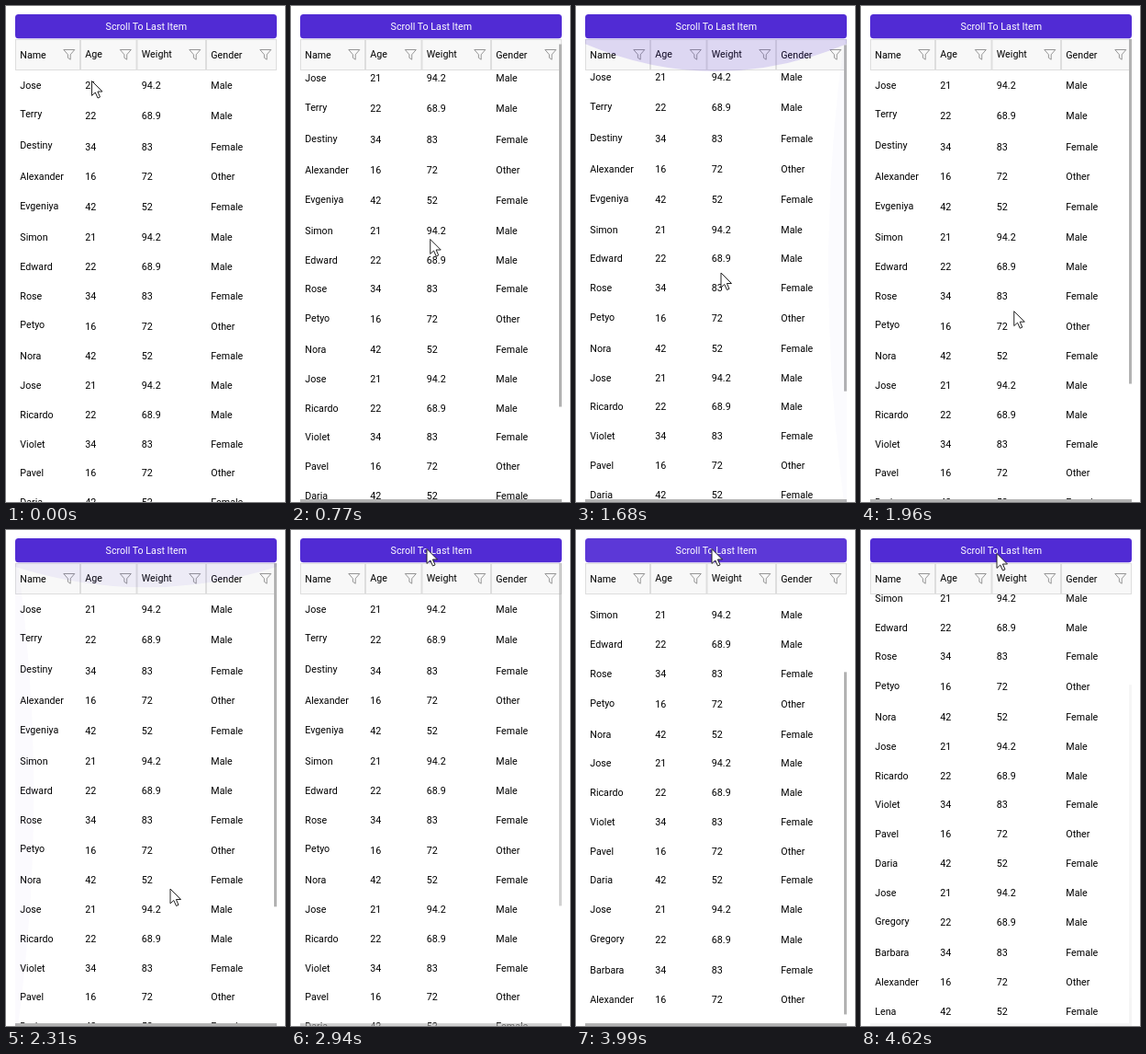
Animation, 304 px wide and 539 px high, one loop 5.53 s. Source, as an HTML page:

```html
<!DOCTYPE html>
<html lang="en">
<head>
<meta charset="utf-8">
<title>Data grid scrolling</title>
<style>
html, body { margin: 0; width: 100%; height: 100%; overflow: hidden; background: #fff; }
svg { display: block; width: 100vw; height: 100vh; }
text { font: 10.7px Roboto, Arial, sans-serif; fill: #000; }
</style>
</head>
<body>
<svg viewBox="0 0 304 539">
  <defs>
    <clipPath id="bodyClip"><rect x="10" y="70" width="285" height="469"/></clipPath>
    <clipPath id="buttonClip"><rect x="10" y="9" width="285" height="26.3" rx="3.5"/></clipPath>
  </defs>
  <rect width="304" height="539" fill="#fff"/>
  <g clip-path="url(#bodyClip)"><g id="rows"></g></g>
  <g id="header">
    <rect x="10.5" y="36.5" width="284" height="33" fill="#f8f8f8" stroke="#dedede"/>
  </g>
  <g id="bars" fill="#b3b3b3">
    <rect x="10" y="536" width="285" height="3"/>
    <rect id="thumb" x="292" width="3"/>
  </g>
  <g id="glows" fill="#512bd4"></g>
  <g clip-path="url(#buttonClip)">
    <rect x="10" y="9" width="285" height="27" fill="#512bd4"/>
    <circle id="ripple" cx="147.5" cy="22" fill="#fff"/>
  </g>
  <text x="152.8" y="26.2" text-anchor="middle" style="fill:#fff">Scroll To Last Item</text>
  <path id="cursor" d="M.5 .5V16.4L4.3 13L7 19L9.5 17.9L6.9 12H12Z" fill="#fff" stroke="#222" stroke-linejoin="round"/>
</svg>
<script>
const LOOP = 5530, STEP = 70;
const EDGES = [10, 81, 142.5, 218, 295];
const TITLES = ["Name", "Age", "Weight", "Gender"];
const NAMES = ["Jose", "Terry", "Destiny", "Alexander", "Evgeniya", "Simon", "Edward",
  "Rose", "Petyo", "Nora", "Jose", "Ricardo", "Violet", "Pavel", "Daria", "Jose",
  "Gregory", "Barbara", "Alexander", "Lena"];
const RECORDS = ["21 94.2 Male", "22 68.9 Male", "34 83 Female", "16 72 Other", "42 52 Female"];

// Pointer stops: time, x, y
const STOPS = [[280, 151, 271], [1260, 151.5, 235], [1680, 157.5, 289.5],
  [2310, 178.5, 389.5], [2940, 147.5, 20], [4480, 147.5, 20], [4620, 147.5, 25]];

const $ = id => document.getElementById(id);

function set(node, attrs) {
  for (const key in attrs) node.setAttribute(key, attrs[key]);
}

function add(parent, tag, attrs) {
  const node = document.createElementNS("http://www.w3.org/2000/svg", tag);
  set(node, attrs);
  return parent.appendChild(node);
}

const ramp = (t, from, to) => Math.min(1, Math.max(0, (t - from) / (to - from)));
const smooth = p => p * p * (3 - 2 * p);
const ease = (t, from, to) => smooth(ramp(t, from, to));
const pulse = (t, peak, span) => smooth(Math.max(0, 1 - Math.abs(t - peak) / span));

// Labels are centred on their ink, so descenders lift the baseline.
const hasTail = text => /[gjpqy]/.test(text);

function label(parent, text, column, middle) {
  const y = middle + (hasTail(text) ? 2.7 : 3.8);
  add(parent, "text", { x: EDGES[column] + 5.3, y }).textContent = text;
}

function buildHeader() {
  const header = $("header");
  TITLES.forEach((title, i) => {
    if (i) add(header, "rect", { x: EDGES[i] - 1, y: 36, width: 2, height: 34, fill: "#dedede" });
    label(header, title, i, 53);
    add(header, "path", {
      d: `M${EDGES[i + 1] - 18.2} 47.5h12l-4.6 5.3v5.4l-2.8-1.9v-3.5z`,
      fill: "none", stroke: "#8c8c8c", "stroke-width": 0.9, "stroke-linejoin": "round"
    });
  });
}

function buildRows() {
  let top = 70;
  NAMES.forEach((name, i) => {
    const height = hasTail(name) ? 34 : 31.75;
    const cells = [name, ...RECORDS[i % RECORDS.length].split(" ")];
    cells.forEach((text, column) => label($("rows"), text, column, top + height / 2));
    top += height;
  });
}

const addGlow = () => add($("glows"), "path", { d: "M-1 0V.15Q0 1.85 1 .15V0Z" });

// Overscroll arcs: each matrix places the unit arc against one side of the grid.
function drawGlows(t) {
  const top = pulse(t, 1680, 280) + 0.75 * pulse(t, 2310, 350);
  const left = pulse(t, 1260, 280) + 0.7 * pulse(t, 2310, 350);
  const right = pulse(t, 1680, 280);
  set(glowTop, { transform: `matrix(142.5 0 0 ${35 * top} 152.5 36)`, opacity: 0.16 * top ** 3 });
  set(glowLeft, { transform: `matrix(0 251 ${29 * left} 0 10 287.5)`, opacity: 0.065 * left ** 3 });
  set(glowRight, { transform: `matrix(0 251 ${-20 * right} 0 295 287.5)`, opacity: 0.018 * right });
}

function scrollAt(t) {
  const touch = t >= 280 && t < 1960 ? 7.4 : 0;
  return touch + 94 * pulse(t, 1260, 450) + 177.3 * ease(t, 3710, 4060);
}

function cursorAt(t) {
  if (t < 280) return [93, 81];
  const next = STOPS.findIndex(stop => t < stop[0]);
  if (next < 0) return STOPS[STOPS.length - 1].slice(1);
  const [t0, x0, y0] = STOPS[next - 1], [t1, x1, y1] = STOPS[next];
  const p = ease(t, t0, t1);
  return [x0 + (x1 - x0) * p, y0 + (y1 - y0) * p];
}

function draw(time) {
  const t = Math.floor((time % LOOP) / STEP) * STEP;
  const scroll = scrollAt(t);
  set($("rows"), { transform: `translate(0 ${-scroll})` });
  set($("thumb"), { y: 36 + scroll * 0.745, height: 372 + 22 * Math.exp((770 - t) / 550) });
  set($("bars"), {
    opacity: ramp(t, 210, 280) - ramp(t, 2800, 3150) + ramp(t, 3710, 3780) - 0.88 * ramp(t, 4480, 4620)
  });
  drawGlows(t);
  set($("ripple"), { r: 95.5 * Math.max(0, t - 3640) / STEP, opacity: 0.25 * (1 - ramp(t, 3780, 4060)) });
  set($("cursor"), {
    transform: `translate(${cursorAt(t)})`,
    opacity: t < 280 ? 1 - ramp(t, 0, 140) : 1
  });
}

const glowTop = addGlow(), glowLeft = addGlow(), glowRight = addGlow();
buildHeader();
buildRows();
const start = performance.now();
function tick() {
  draw(performance.now() - start);
  requestAnimationFrame(tick);
}
tick();
</script>
</body>
</html>
```
